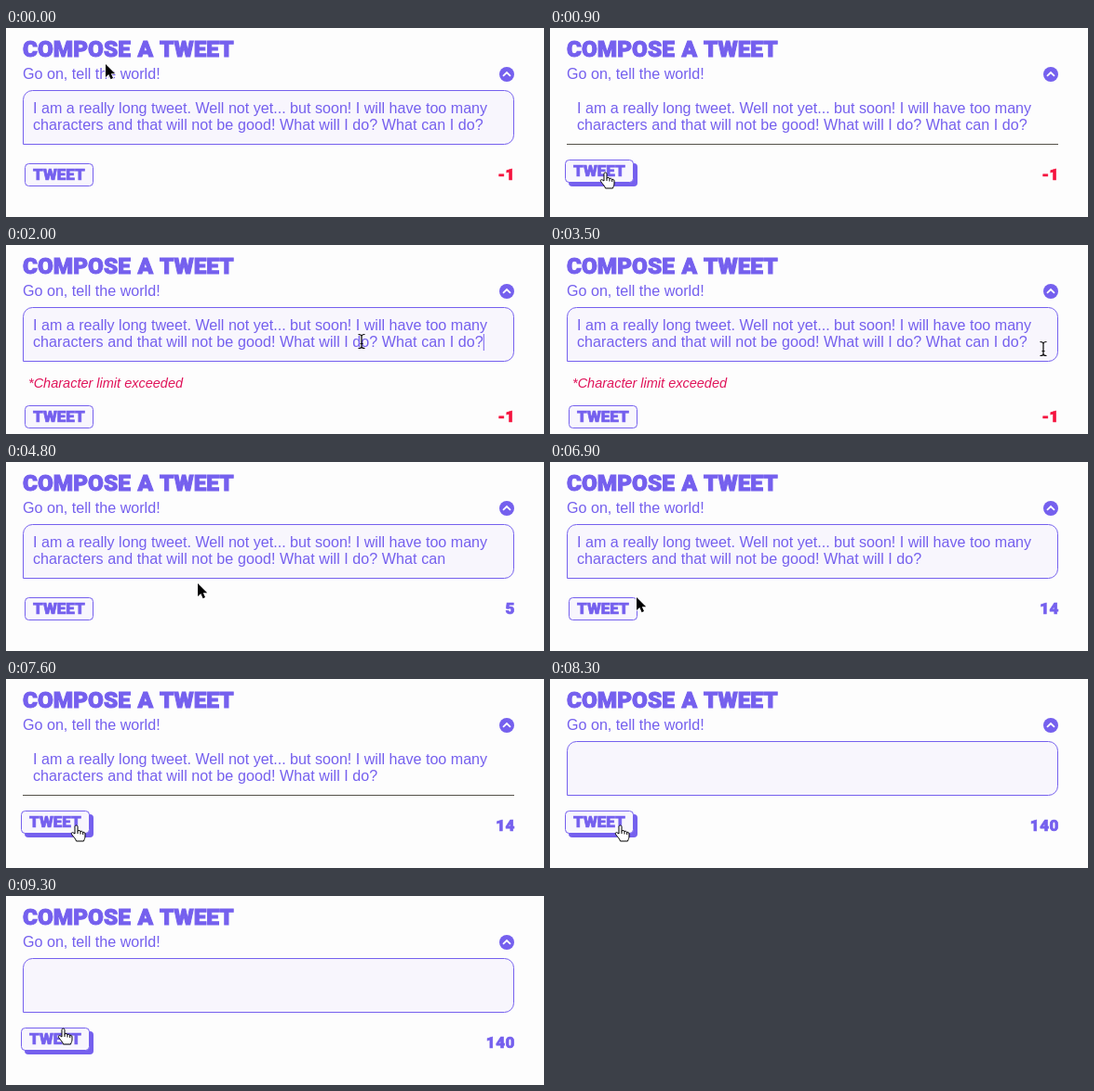
These frames come from a looping animation (578x204 px, 9.5 s). An HTML page:

```html
<!DOCTYPE html>
<html lang="en">
<head>
<meta charset="utf-8">
<title>Compose a tweet</title>
<style>
  html, body { margin: 0; width: 100%; height: 100%; overflow: hidden; background: #fdfdfd; }
  svg { display: block; width: 578px; height: 204px; }
  text { fill: #7560ee; font-family: "Liberation Sans", Arial, sans-serif; font-size: 16.1px; white-space: pre; }
  .display { font-family: Roboto, Inter, sans-serif; font-weight: 900; font-size: 17.1px; stroke: currentColor; stroke-width: .7; color: #7560ee; }
  #title { font-size: 24.4px; word-spacing: 1.5px; stroke-width: 1; }
  #line2 { letter-spacing: .05px; }
  #count { letter-spacing: .5px; text-anchor: end; }
  #count.over { fill: #f5143f; color: #f5143f; }
  #error text { fill: #e0145a; font-size: 14.5px; font-style: italic; }
  .frame { fill: #f8f6fd; stroke: #7560ee; }
  .purple { fill: #7560ee; }
</style>
</head>
<body>
<svg viewBox="0 0 578 204">
  <defs><clipPath id="errorClip"><rect id="errorWindow" x="0" y="135" width="578" height="0"/></clipPath></defs>

  <text id="title" class="display" x="18" y="31">COMPOSE A TWEET</text>
  <text x="18" y="55">Go on, tell the world!</text>
  <circle class="purple" cx="538" cy="50" r="8"/>
  <path d="M534 51.8L538 48L542 51.8" fill="none" stroke="#fff" stroke-width="1.8"/>

  <path id="focusBox" class="frame" d="M18.5 125.5V77.5A10 10 0 0 1 28.5 67.5H535.5A10 10 0 0 1 545.5 77.5V115.5A10 10 0 0 1 535.5 125.5Z"/>
  <path id="underline" d="M18 125.5H546" stroke="#545149"/>
  <text x="29" y="92" id="line1"></text>
  <text x="29" y="110" id="line2"></text>
  <rect id="caret" class="purple" width="1" height="18"/>

  <g id="error" clip-path="url(#errorClip)"><text x="24" y="154">*Character limit exceeded</text></g>

  <g id="footer">
    <rect id="shadow" class="purple" x="20" y="146" width="74" height="25" rx="4"/>
    <g id="button">
      <rect class="frame" x="20.5" y="146.5" width="73" height="24" rx="4"/>
      <text class="display" x="29" y="164">TWEET</text>
    </g>
    <text id="count" class="display" x="547" y="164"></text>
  </g>

  <g id="pointer" stroke-linejoin="round">
    <path id="arrow" d="M0 0V14L3.3 11L5.6 16.2L8 15.1L5.8 10.2H10.2Z" stroke="#fff" paint-order="stroke" stroke-width="1.6"/>
    <path id="hand" d="M-2 9V1.5C-2-.5 1-.5 1 1.5V6.5C1 5 4 5 4 7C4 5.7 6.7 6 6.7 8C6.8 7 9 7 9 9V12C9 14 8 15 7.5 17H-.5C-1 14.5-4 12-5.5 9.5C-6.5 8-4.5 7-3.2 8.3Z M1 6.5V9M4 7V9.5M6.7 8V10" fill="#fff" stroke="#000"/>
    <path id="beam" d="M-3.5-7.5Q0-7.5 0-5.5Q0-7.5 3.5-7.5M0-5.5V5.5M-3.5 7.5Q0 7.5 0 5.5Q0 7.5 3.5 7.5M-1.5 2.5H1.5" fill="none" stroke="#000" stroke-width="1.2"/>
  </g>
</svg>
<script>
const LOOP = 9500, STEP = 100, LIMIT = 140, ERROR_HEIGHT = 27;
const FIRST_LINE = "I am a really long tweet. Well not yet... but soon! I will have too many ";
const MESSAGE = FIRST_LINE + "characters and that will not be good! What will I do? What can I do?";
const REJECTED = 1000, SENT = 7800;

// Backspace presses: two bursts with a pause between them.
const burst = (start, count) => Array.from({ length: count }, (_, i) => start + 125 * i);
const deletions = [...burst(3800, 5), ...burst(5000, 9)];
// The caret blink restarts at each of these moments.
const caretResets = [-800, REJECTED, ...deletions, SENT];

// Pointer stops: time, x, y
const pointerPath = [
  [0, 107, 39], [700, 60, 156], [1400, 60, 156], [2000, 382, 104], [2600, 530, 112],
  [3700, 530, 112], [4800, 206, 131], [5700, 107, 146], [6300, 96, 147], [6700, 96, 147],
  [6900, 93, 146], [7500, 76, 158], [8400, 76, 158], [8800, 62, 143], [LOOP, 62, 143]
];

const $ = id => document.getElementById(id);
const show = (id, visible) => $(id).setAttribute("display", visible ? "inline" : "none");
const move = (id, x, y) => $(id).setAttribute("transform", `translate(${x} ${y})`);
const between = (t, start, end) => t >= start && t < end;

function swing(t, start, duration) {
  const p = Math.min(1, Math.max(0, (t - start) / duration));
  return (1 - Math.cos(Math.PI * p)) / 2;
}

function pointerAt(t) {
  const i = pointerPath.findIndex(stop => stop[0] > t);
  const [t0, x0, y0] = pointerPath[i - 1], [t1, x1, y1] = pointerPath[i];
  const p = (t - t0) / (t1 - t0);
  return [x0 + (x1 - x0) * p, y0 + (y1 - y0) * p];
}

function drawText(t, focused) {
  const deleted = deletions.filter(time => time <= t).length;
  const text = t >= SENT ? "" : MESSAGE.slice(0, MESSAGE.length - deleted);
  $("line1").textContent = text.slice(0, FIRST_LINE.length);
  $("line2").textContent = text.slice(FIRST_LINE.length);

  const left = LIMIT - text.trim().length;
  $("count").textContent = left;
  $("count").classList.toggle("over", left < 0);

  const lastReset = caretResets.filter(time => time <= t).pop();
  show("caret", focused && Math.floor((t - lastReset) / 500) % 2 === 0);
  $("caret").setAttribute("x", 29 + (text ? $("line2").getComputedTextLength() : 0));
  $("caret").setAttribute("y", text ? 96 : 78);
}

function draw(t) {
  const focused = !between(t, 900, REJECTED) && !between(t, 7600, SENT);
  show("focusBox", focused);
  show("underline", !focused);
  drawText(t, focused);

  const slide = ERROR_HEIGHT * (swing(t, REJECTED, 400) - swing(t, deletions[0], 300));
  $("errorWindow").setAttribute("height", slide);
  move("footer", 0, slide);

  const [x, y] = pointerAt(t);
  const overButton = x > 16 && x < 90 && y > 142 + slide && y < 171 + slide;
  const overBox = x > 18 && x < 546 && y > 67 && y < 126;
  show("shadow", overButton);
  move("button", overButton ? -4 : 0, overButton ? -4 : 0);
  move("pointer", x, y);
  show("hand", overButton);
  show("beam", overBox);
  show("arrow", !overButton && !overBox);
}

function tick(now) {
  draw(Math.floor((now % LOOP) / STEP) * STEP);
  requestAnimationFrame(tick);
}
draw(0);
requestAnimationFrame(tick);
</script>
</body>
</html>
```
